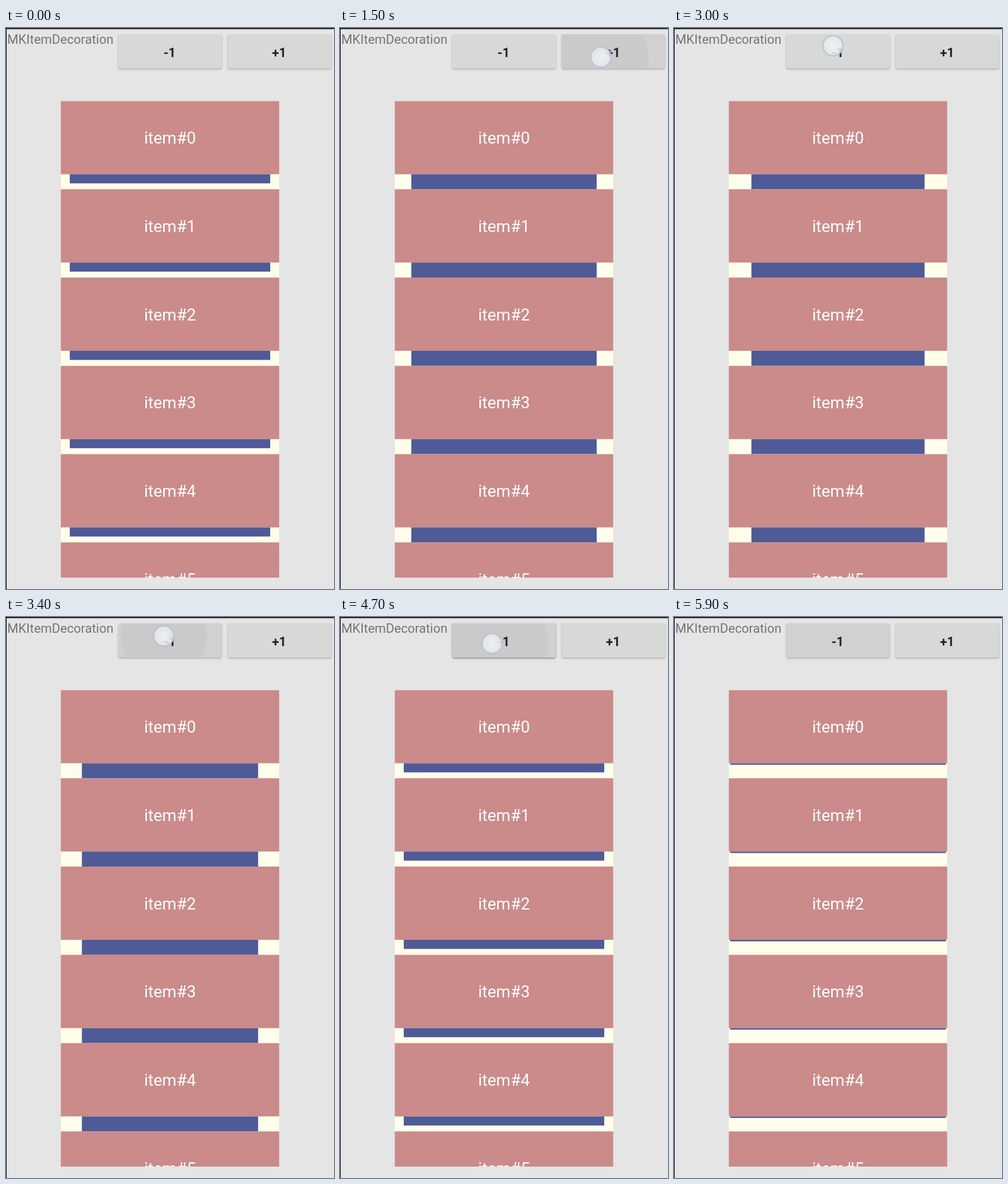
These frames come from a looping animation (520x888 px, 6900 ms). An HTML page:

```html
<!DOCTYPE html>
<html lang="en">
<head>
<meta charset="utf-8">
<title>Item decoration</title>
<style>
html, body { margin: 0; width: 100%; height: 100%; overflow: hidden; background: #e5e5e5; }
svg { display: block; width: 520px; height: 888px; font-family: Roboto, "Noto Sans", sans-serif; }
</style>
</head>
<body>
<svg id="stage" viewBox="0 0 520 888">
  <defs>
    <clipPath id="listClip"><rect x="86.7" y="115.5" width="346.6" height="754.5"/></clipPath>
    <filter id="soft" x="-10%" y="-30%" width="120%" height="160%"><feGaussianBlur stdDeviation="1.5"/></filter>
    <radialGradient id="glass">
      <stop offset="0" stop-color="#f3f4f4"/>
      <stop offset="0.8" stop-color="#e8eaec"/>
      <stop offset="1" stop-color="#dfe3ec"/>
    </radialGradient>
  </defs>
  <rect width="520" height="888" fill="#e5e5e5"/>
  <rect y="1" width="520" height="2" fill="#d5cfd4"/>
  <rect width="520" height="1.5"/>
  <rect width="1" height="888"/>
  <text x="2" y="24.5" font-size="20.2" fill="#757575">MKItemDecoration</text>
  <g id="buttons"></g>
  <g id="list" clip-path="url(#listClip)"></g>
  <g id="pointer">
    <circle r="16" fill="url(#glass)" fill-opacity="0.87" stroke="#b9c1da" stroke-width="2"/>
  </g>
</svg>
<script>
const LOOP = 6900, STEP = 100;
const UNIT = 2.4, PITCH = 139.75, ROW = 116, GAP = PITCH - ROW;
const LEFT = 86.7, RIGHT = 433.3, TOP = 115.5, START = 6;
const plusClicks = [500, 800, 1000, 1200, 1500, 1700, 1900, 2200, 2400];
const minusClicks = [3400, 3500, 3700, 3800, 4000, 4200, 4300, 4500, 4700, 4900, 5000, 5400, 5600, 5800];
// time, x, y, ripple radius
const path = [
  [200, 405, 47, 70], [900, 408, 49, 74], [2200, 420, 43, 77], [2500, 420, 43, 77],
  [3000, 252, 28, 66], [3400, 250, 30, 68], [4100, 245, 34, 78], [4700, 241, 42, 89],
  [5000, 245, 33, 86], [5900, 245, 34, 80]
];
const shown = [[200, 2500], [3000, 5100], [5300, 5900]];

const byId = id => document.getElementById(id);
const within = (t, [from, to]) => t >= from && t < to;

function add(parent, tag, attrs, text) {
  const el = document.createElementNS("http://www.w3.org/2000/svg", tag);
  set(el, attrs);
  if (text) el.textContent = text;
  parent.append(el);
  return el;
}

function set(el, attrs) {
  for (const key in attrs) el.setAttribute(key, attrs[key]);
}

function makeButton(label, x, clicks, active, raised) {
  const box = { x, y: 10, width: 164, height: 54, rx: 3 };
  const group = byId("buttons");
  const shadow = add(group, "rect", { ...box, y: 11.5, filter: "url(#soft)" });
  const face = add(group, "rect", box);
  const clip = add(group, "clipPath", { id: "clip" + x });
  add(clip, "rect", box);
  const ripple = add(group, "circle", { fill: "#c9cac9", "clip-path": `url(#clip${x})` });
  add(group, "text", {
    x: x + 81.5, y: 45.5, "font-size": 20.2, "font-weight": 600,
    "text-anchor": "middle", fill: "#202120"
  }, label);
  return { shadow, face, ripple, clicks, active, raised };
}

const buttons = [
  makeButton("-1", 178, minusClicks, [3100, LOOP], [3700, 5800]),
  makeButton("+1", 351.5, plusClicks, [200, 2600], [800, 1500])
];

const list = byId("list");
add(list, "rect", { x: LEFT, y: TOP, width: RIGHT - LEFT, height: 760, fill: "#fffdeb" });
const bars = [];
for (let i = 0; i < 6; i++) {
  const y = TOP + i * PITCH;
  add(list, "rect", { x: LEFT, y, width: RIGHT - LEFT, height: ROW, fill: "#ca8b8a" });
  add(list, "text", {
    x: 260, y: y + 67.5, "font-size": 26, "text-anchor": "middle", fill: "#fff"
  }, "item#" + i);
  bars.push(add(list, "rect", { y: y + ROW, fill: "#4f5b96" }));
}

function touchAt(t) {
  if (t <= path[0][0]) return path[0];
  const next = path.findIndex(p => p[0] > t);
  if (next < 0) return path[path.length - 1];
  const a = path[next - 1], b = path[next];
  const k = (t - a[0]) / (b[0] - a[0]);
  return a.map((v, i) => v + (b[i] - v) * k);
}

function render(t) {
  const passed = clicks => clicks.filter(c => c <= t).length;
  const size = (START + passed(plusClicks) - passed(minusClicks)) * UNIT;
  for (const bar of bars) {
    set(bar, { x: LEFT + size, width: RIGHT - LEFT - 2 * size, height: Math.min(size, GAP) });
  }

  const [, x, y, r] = touchAt(t);
  for (const b of buttons) {
    const spreading = b.clicks.includes(t);
    const pressed = within(t, b.active);
    set(b.face, { fill: spreading ? "#d0d1d0" : pressed ? "#d1d1d1" : "#d6d9d5" });
    set(b.shadow, { "fill-opacity": within(t, b.raised) ? 0.42 : 0.25 });
    set(b.ripple, { cx: x, cy: y, r: spreading ? r : 0 });
  }

  const visible = shown.some(span => within(t, span));
  set(byId("pointer"), {
    transform: `translate(${x} ${y})`,
    visibility: visible ? "visible" : "hidden"
  });
}

const began = performance.now();
function tick() {
  const t = (performance.now() - began) % LOOP;
  render(Math.floor(t / STEP) * STEP);
  requestAnimationFrame(tick);
}
render(0);
requestAnimationFrame(tick);
</script>
</body>
</html>
```
